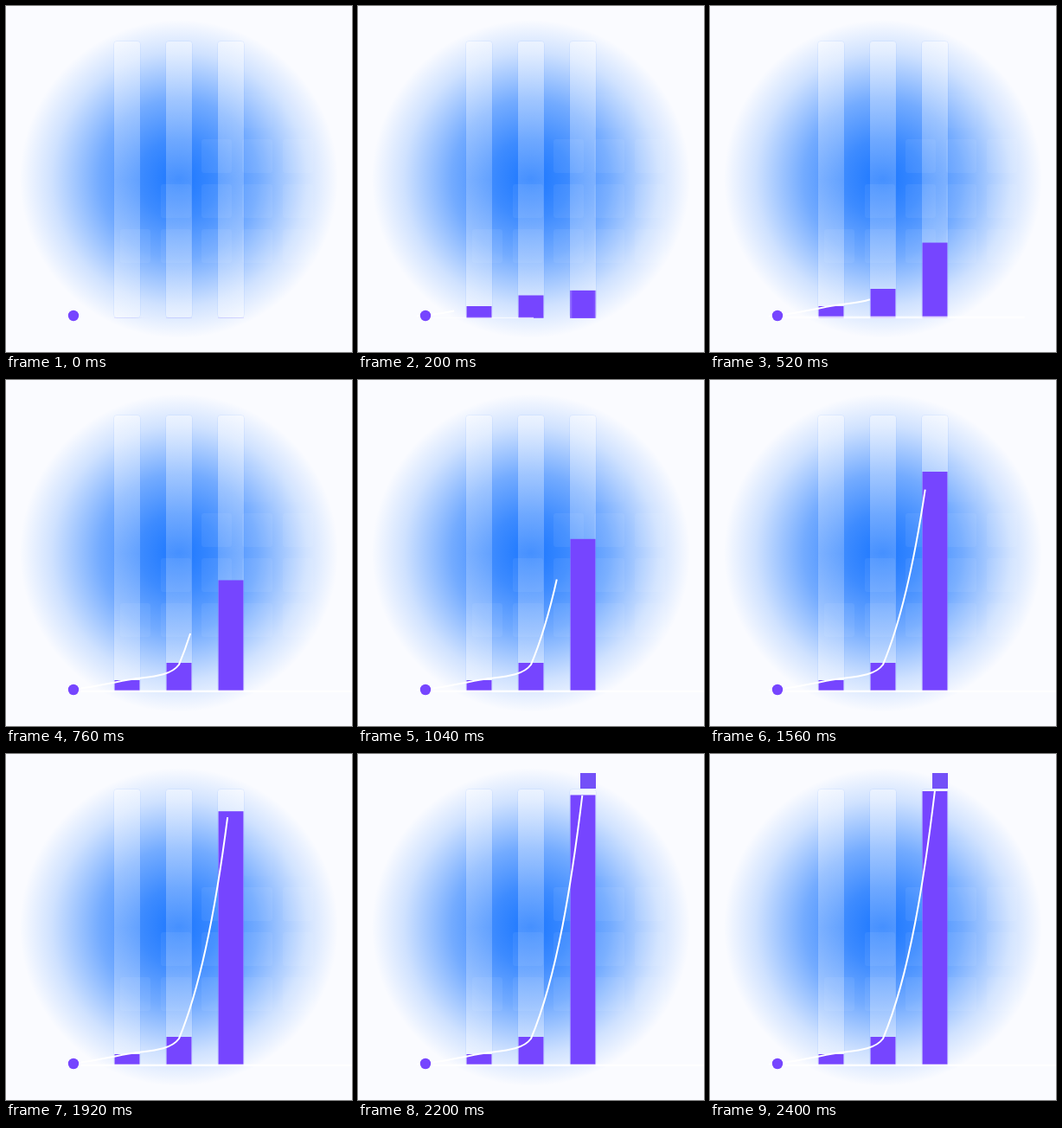
Recreate the animation shown at these times as an HTML page. Size 400x400 px, loop 3000 ms.

```html
<!DOCTYPE html>
<html lang="en">
<head>
<meta charset="utf-8">
<title>Growth chart</title>
<style>
  html, body { margin: 0; width: 100%; height: 100%; overflow: hidden; background: #fafbff; }
  svg { display: block; width: 100vw; height: 100vh; }
  #bars rect { transform-origin: 0 361px; }
  #axis { transform-origin: 78px 361px; }
  #badge { transform-origin: 266px 31px; }
</style>
</head>
<body>
<svg viewBox="0 0 400 400">
  <defs>
    <radialGradient id="glow" gradientUnits="userSpaceOnUse" cx="200" cy="200" r="184">
      <stop offset="0" stop-color="#1a76ff"/>
      <stop offset=".25" stop-color="#1a76ff" stop-opacity=".84"/>
      <stop offset=".5" stop-color="#1a76ff" stop-opacity=".6"/>
      <stop offset=".8" stop-color="#1a76ff" stop-opacity=".19"/>
      <stop offset="1" stop-color="#1a76ff" stop-opacity="0"/>
    </radialGradient>
    <linearGradient id="glass" x1="0" y1="0" x2="0" y2="1">
      <stop offset="0" stop-color="#fff" stop-opacity=".42"/>
      <stop offset=".5" stop-color="#fff" stop-opacity=".19"/>
      <stop offset="1" stop-color="#fff" stop-opacity=".34"/>
    </linearGradient>
  </defs>
  <rect width="400" height="400" fill="#fafbff"/>
  <circle cx="200" cy="200" r="184" fill="url(#glow)"/>
  <g id="tiles" fill="#fff"></g>
  <g id="tracks" fill="url(#glass)"></g>
  <g id="bars" fill="#7645ff"></g>
  <rect id="axis" x="78" y="358.7" width="324" height="2.3" fill="#fff"/>
  <path id="curve" pathLength="1" fill="none" stroke="#fff" stroke-width="2" stroke-dasharray="1 2"
    d="M68 358.5C95 357 120 350 145 346C165 343 190 343 200 329C231 255 248 142 260 42"/>
  <circle cx="78" cy="358" r="6.2" fill="#7645ff"/>
  <rect id="badge" x="257" y="22" width="18" height="18" fill="#7350f8"/>
</svg>
<script>
const LOOP = 3000, BASE = 361;
const GROW = 'cubic-bezier(.28, .32, .68, 1)';
const SINE_OUT = 'cubic-bezier(.39, .575, .565, 1)';
const BACK_OUT = 'cubic-bezier(.34, 1.56, .64, 1)';
const $ = id => document.getElementById(id);

function addRect(parent, attrs) {
  const el = document.createElementNS('http://www.w3.org/2000/svg', 'rect');
  for (const k in attrs) el.setAttribute(k, attrs[k]);
  return parent.appendChild(el);
}

// Moves one property between two values from start to end (ms), then holds until the loop restarts
function play(el, prop, from, to, start, end, easing) {
  el.animate([
    { [prop]: from, offset: 0 },
    { [prop]: from, offset: start / LOOP, easing },
    { [prop]: to, offset: end / LOOP },
    { [prop]: to, offset: 1 }
  ], { duration: LOOP, iterations: Infinity });
}

// Staircase of faint tiles
for (let row = 0; row < 4; row++)
  for (let x = 273 - row * 47; x < 340; x += 47)
    addRect($('tiles'), { x, y: 102 + row * 52, width: 35, height: 39, rx: 3, opacity: row ? .06 : .02 });

const columns = [
  { x: 125, height: 14, end: 160 },
  { x: 185, height: 34, end: 320 },
  { x: 245, height: 318, end: 2400 }
];
for (const { x, height, end } of columns) {
  addRect($('tracks'), { x: x - .5, y: 40.5, width: 31, height: 320, rx: 4, fill: 'none', stroke: '#3c82ff', 'stroke-opacity': .07 });
  addRect($('tracks'), { x, y: 41, width: 30, height: 319, rx: 3 });
  const bar = addRect($('bars'), { x: x + .5, y: BASE - height, width: 29, height });
  play(bar, 'transform', 'scaleY(0)', 'scaleY(1)', 0, end, GROW);
}

play($('axis'), 'transform', 'scale(0)', 'scale(1)', 0, 800, SINE_OUT);
play($('curve'), 'strokeDashoffset', 1, 0, 0, 2400, GROW);
play($('badge'), 'transform', 'scale(0)', 'scale(1)', 2080, 2400, BACK_OUT);
</script>
</body>
</html>
```
